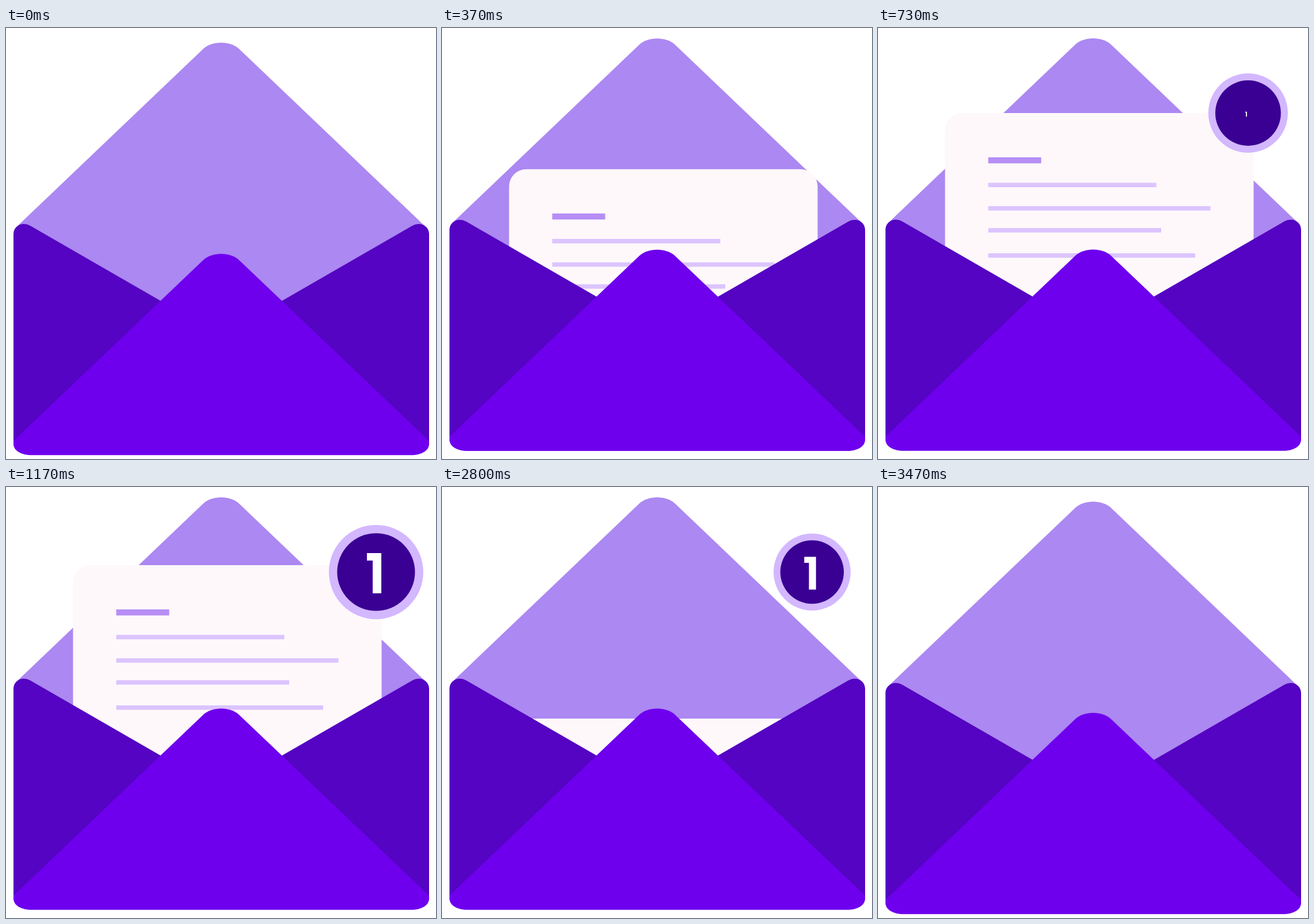
Animation of 747x750 px, one loop 3.51 s. Source, as an HTML page with a canvas:

```html
<!DOCTYPE html>
<html lang="en">
<head>
<meta charset="utf-8">
<title>New mail</title>
<style>
  html, body { margin: 0; width: 100%; height: 100%; overflow: hidden; background: #fff; }
  canvas { display: block; }
</style>
</head>
<body>
<canvas id="stage" width="747" height="750" role="img" aria-label="Envelope with 1 new letter"></canvas>
<script>
const ctx = document.getElementById('stage').getContext('2d');
const LOOP = 3510;
const SAG = 7.5;
const LETTER = { x: 116.5, w: 536, up: 136, down: 535, r: 30 };
const BADGE = { x: 642.9, y: 148, r: 82, inner: 67.6 };
const DIGIT = { x: 639.5, y: 150 };

const BACK = new Path2D('M20 337 L343 28.5 C358 14.5 389.5 14.5 404.5 28.5 L727.5 337 V400 L373.75 600 L20 400Z');
const SIDE = new Path2D('M13 718 V351 C13 341 21 333.5 31 333.5 Q37 333.5 42 336.5 L373.75 528 V718Z');
const FRONT = new Path2D('M13 711 L343 396 C358 382 389.5 382 404.5 396 L735 711 V716 C735 728 722 735.8 703 735.8 H45 C26 735.8 13 728 13 716Z');
const ONE = new Path2D('M-12.5 -35 H12.5 V35 H-2.5 V-22 H-12.5Z');

// Text bars: top offset, height, right edge, colour
const BARS = [
  [77, 10.5, 283.5, '#b68ef5'],
  [121.3, 7.7, 483.5, '#dcc4ff'],
  [162, 7.7, 577.5, '#dcc4ff'],
  [200.2, 7.7, 492, '#dcc4ff'],
  [244, 7.7, 551, '#dcc4ff']
];

const progress = (t, start, span) => Math.min(1, Math.max(0, (t - start) / span));
const easeOut = p => 1 - (1 - p) ** 3;
const easeInOut = p => (1 - Math.cos(Math.PI * p)) / 2;

function pose(t) {
  const shrink = 1 - easeInOut(progress(t, 2660, 500));
  const rise = easeOut(progress(t, 0, 1061)) - easeInOut(progress(t, 2496, 500));
  return {
    sag: SAG * (1 - easeOut(progress(t, 0, 500)) + easeOut(progress(t, 3000, 470))),
    top: LETTER.down + (LETTER.up - LETTER.down) * rise,
    badge: easeOut(progress(t, 501, 500)) * shrink,
    digit: easeOut(progress(t, 711, 480)) * shrink
  };
}

function fill(path, color) {
  ctx.fillStyle = color;
  ctx.fill(path);
}

function disc(r, color) {
  ctx.fillStyle = color;
  ctx.beginPath();
  ctx.arc(BADGE.x, BADGE.y, r, 0, Math.PI * 2);
  ctx.fill();
}

function drawLetter(top) {
  ctx.save();
  ctx.beginPath();
  ctx.rect(0, 0, 747, 560);
  ctx.clip();
  ctx.fillStyle = '#fef8fb';
  ctx.beginPath();
  ctx.roundRect(LETTER.x, top, LETTER.w, 380, LETTER.r);
  ctx.fill();
  for (const [y, h, right, color] of BARS) {
    ctx.fillStyle = color;
    ctx.fillRect(191.5, top + y, right - 191.5, h);
  }
  ctx.restore();
}

function drawPocket() {
  fill(SIDE, '#5404c2');
  ctx.save();
  ctx.translate(748, 0);
  ctx.scale(-1, 1);
  fill(SIDE, '#5404c2');
  ctx.restore();
  fill(FRONT, '#6e00ee');
}

function drawBadge(scale, digit) {
  if (scale <= 0) return;
  disc(BADGE.r * scale, '#d3b7ff');
  disc(BADGE.inner * scale, '#3a0093');
  if (digit <= 0) return;
  ctx.save();
  ctx.translate(DIGIT.x, DIGIT.y);
  ctx.scale(digit, digit);
  fill(ONE, '#fff');
  ctx.restore();
}

function draw(t) {
  const { sag, top, badge, digit } = pose(t);
  ctx.fillStyle = '#fff';
  ctx.fillRect(0, 0, 747, 750);
  ctx.save();
  ctx.translate(0, sag);
  fill(BACK, '#ac88f2');
  ctx.restore();
  drawLetter(top);
  ctx.save();
  ctx.translate(0, sag);
  drawPocket();
  ctx.restore();
  drawBadge(badge, digit);
}

const start = performance.now();
function tick() {
  draw((performance.now() - start) % LOOP);
  requestAnimationFrame(tick);
}
tick();
</script>
</body>
</html>
```
